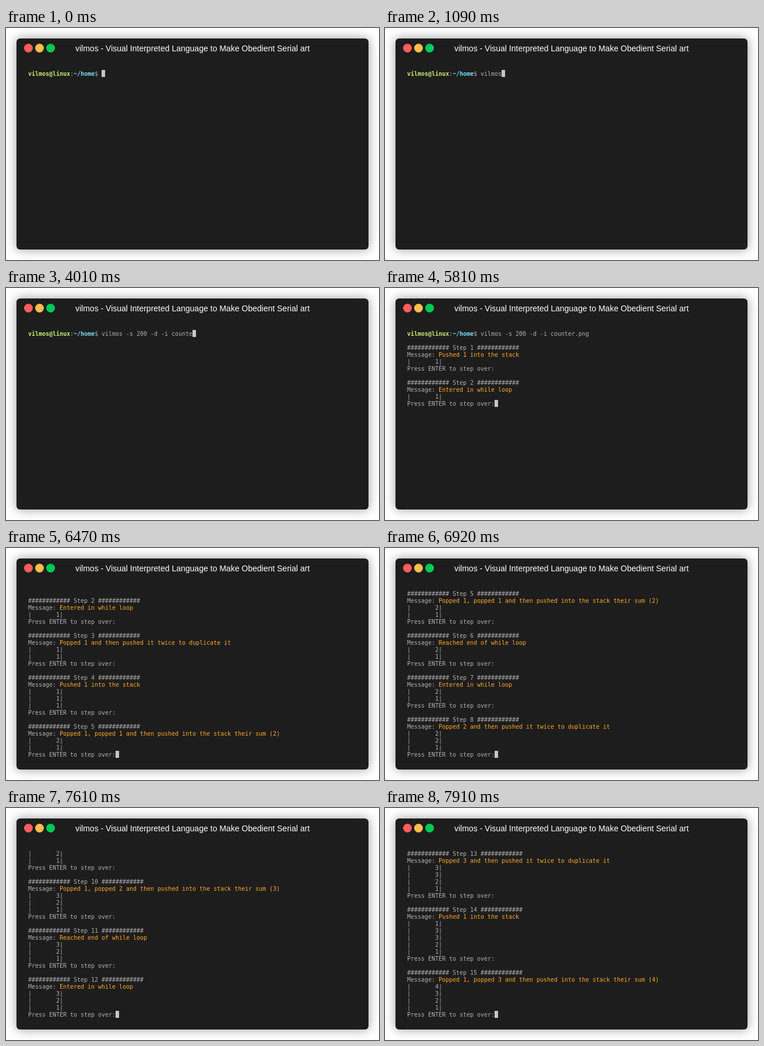
These frames come from a looping animation (640x398 px, 8000 ms). An HTML page with a canvas:

```html
<!DOCTYPE html>
<html lang="en">
<head>
<meta charset="utf-8">
<title>Terminal session</title>
<style>
  html, body { margin: 0; width: 100%; height: 100%; overflow: hidden; background: #fff; }
  canvas { display: block; }
  #window {
    position: absolute; left: 18px; top: 18px; width: 604px; height: 362px;
    border-radius: 6px; background: #1d1d1d; box-shadow: 0 0 18px #999;
  }
  #screen { position: absolute; left: 0; top: 0; }
</style>
</head>
<body>
<div id="window"></div>
<canvas id="screen" width="640" height="398"></canvas>
<script>
const ctx = document.getElementById('screen').getContext('2d');
const LOOP = 8000;
const LEFT = 38, TOP = 72, CELL = 6, LINE = 12, ROWS = 24;
const GRAY = '#afafaf', ORANGE = '#ffa727', GREEN = '#c8ed71', BLUE = '#75dff2', CURSOR = '#c7c7c7';
const COMMAND = 'vilmos -s 200 -d -i counter.png';

// Each burst: first time, last time, number of evenly spaced events.
const spread = bursts => bursts.flatMap(([from, to, n]) =>
  Array.from({ length: n }, (_, i) => n > 1 ? from + (to - from) * i / (n - 1) : from));

const keyTimes = spread([[300, 1310, 8], [1450, 2100, 6], [2370, 2870, 4], [3160, 4100, 9], [4230, 4840, 4]]);
const ENTER_TIME = 5260;
const stepTimes = spread([[5360, 5360, 1], [5810, 5810, 1], [6150, 6470, 3], [6620, 7190, 5], [7330, 7910, 5]]);

const countPassed = (times, t) => times.filter(at => t >= at - 0.01).length;
const span = (text, color = GRAY, bold = false) => ({ text, color, bold });

// Runs the counter program and records the output of every debugger step.
function runProgram(count) {
  const stack = [];
  const operations = [
    () => 'Entered in while loop',
    () => {
      stack.unshift(stack[0]);
      return `Popped ${stack[0]} and then pushed it twice to duplicate it`;
    },
    () => {
      stack.unshift(1);
      return 'Pushed 1 into the stack';
    },
    () => {
      const a = stack.shift(), b = stack.shift();
      stack.unshift(a + b);
      return `Popped ${a}, popped ${b} and then pushed into the stack their sum (${a + b})`;
    },
    () => 'Reached end of while loop'
  ];
  return Array.from({ length: count }, (_, i) => {
    const message = i ? operations[(i - 1) % 5]() : operations[2]();
    const hashes = '#'.repeat(12);
    return [
      [],
      [span(`${hashes} Step ${i + 1} ${hashes}`)],
      [span('Message: '), span(message, ORANGE)],
      ...stack.map(value => [span(`|${String(value).padStart(8)}|`)]),
      [span('Press ENTER to step over:')]
    ];
  });
}
const steps = runProgram(stepTimes.length);

function terminalLines(t) {
  const prompt = [
    span('vilmos@linux', GREEN, true), span(':'), span('~/home', BLUE, true),
    span('$ '), span(COMMAND.slice(0, countPassed(keyTimes, t)))
  ];
  const output = steps.slice(0, countPassed(stepTimes, t)).flat();
  if (!output.length && t >= ENTER_TIME) output.push([]);
  return [prompt, ...output].slice(-ROWS);
}

function drawLine(spans, y) {
  let x = LEFT;
  for (const { text, color, bold } of spans) {
    ctx.font = `${bold ? 'bold ' : ''}10px "DejaVu Sans Mono", monospace`;
    ctx.fillStyle = color;
    for (const char of text) {
      ctx.fillText(char, x, y + 10);
      x += CELL;
    }
  }
  return x;
}

function drawTitleBar() {
  ['#ff5c5c', '#ffbd4c', '#00ca56'].forEach((color, i) => {
    ctx.fillStyle = color;
    ctx.beginPath();
    ctx.arc(38.5 + i * 19, 34.5, 7.5, 0, Math.PI * 2);
    ctx.fill();
  });
  ctx.font = '14px "Liberation Sans", Arial, sans-serif';
  ctx.fillStyle = '#fff';
  ctx.textAlign = 'center';
  ctx.fillText('vilmos - Visual Interpreted Language to Make Obedient Serial art', 320, 40);
  ctx.textAlign = 'left';
}

function draw(t) {
  ctx.clearRect(0, 0, 640, 398);
  drawTitleBar();
  const lines = terminalLines(t);
  let cursorX = LEFT;
  lines.forEach((line, row) => { cursorX = drawLine(line, TOP + row * LINE); });
  ctx.fillStyle = CURSOR;
  ctx.fillRect(cursorX, TOP + (lines.length - 1) * LINE, CELL, LINE);
}

const start = performance.now();
function tick() {
  draw((performance.now() - start) % LOOP);
  requestAnimationFrame(tick);
}
tick();
</script>
</body>
</html>
```
